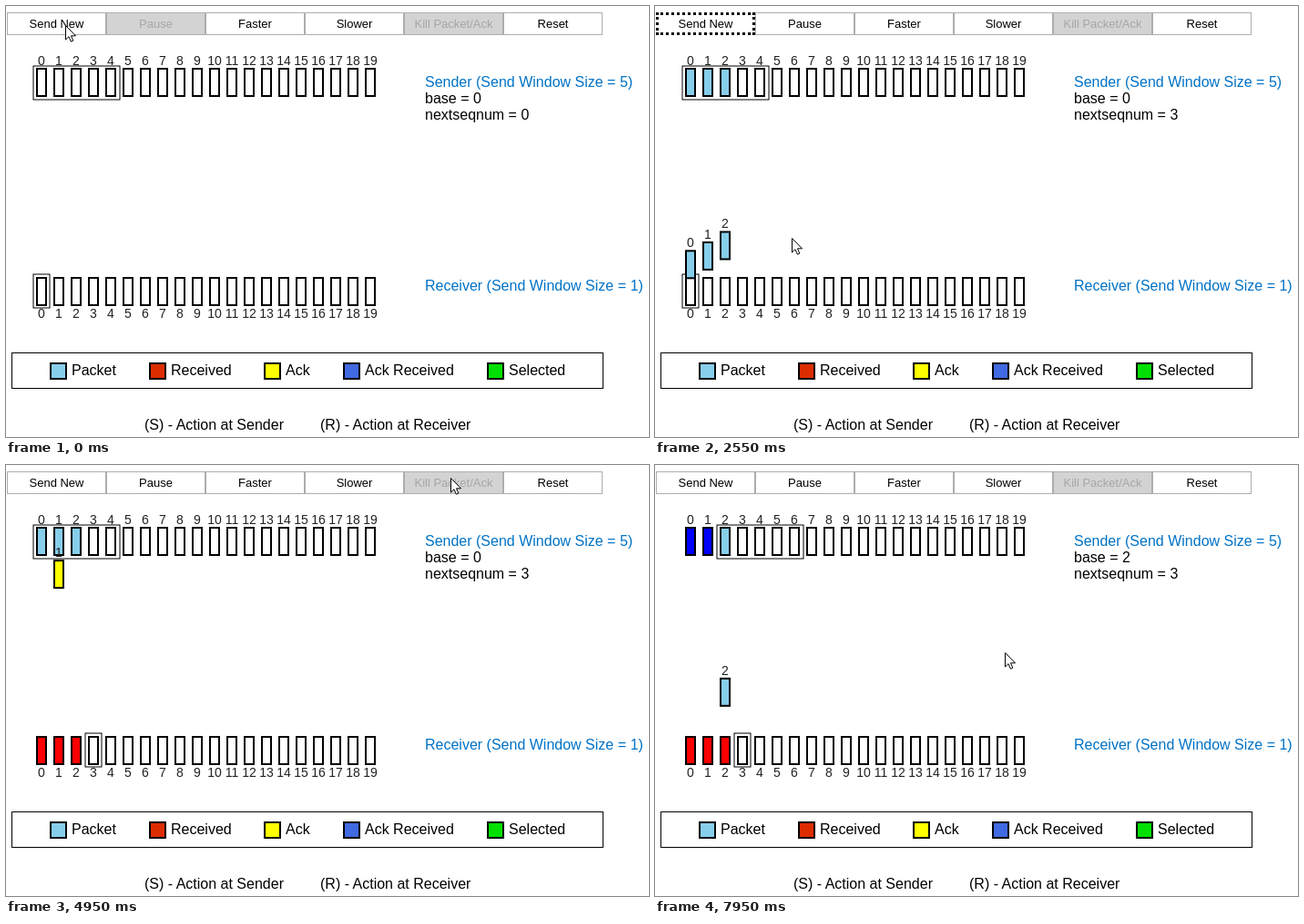
Recreate the animation shown at these times as an HTML page. Size 706 px wide and 474 px high, loop 8 s.

```html
<!DOCTYPE html>
<html lang="en">
<head>
<meta charset="utf-8">
<title>Go-Back-N</title>
<style>
  html, body { margin: 0; width: 100%; height: 100%; overflow: hidden; background: #fff; }
  body, text { font-family: "Liberation Sans", Arial, sans-serif; }
  svg { position: absolute; left: 0; top: 0; width: 706px; height: 474px; font-size: 16px; }
  .bar { position: absolute; left: 1px; top: 7px; display: flex; font-size: 13px; }
  .bar div {
    box-sizing: border-box; width: 109px; height: 25px; border: 1px solid #adadad;
    display: flex; align-items: center; justify-content: center; white-space: nowrap;
  }
  .bar .off { background: #d3d3d3; color: #a6a6a6; }
  .bar .focus { border: 3px dotted #000; }
  .num { font-size: 14px; text-anchor: middle; fill: #222; }
  .box { stroke: #000; stroke-width: 2; fill: #fff; }
  .frame { stroke: #000; fill: none; }
  .title { fill: #0072c6; }
</style>
</head>
<body>
<div class="bar"></div>
<svg viewBox="0 0 706 474"></svg>
<script>
const LOOP = 8000, TICK = 150;
const SPEED = 0.0979;
const TOP = 68, BOTTOM = 299;
const TRIP = (BOTTOM - TOP) / SPEED;
const STARTS = [504, 600, 717];
const PRESS = 450, SELECT_0 = 3000, KILL_0 = 3900, SELECT_2 = 4350, KILL_2 = 4800;
const ACKED = STARTS[1] + 2 * TRIP, RESEND = 6256;
const SKY = '#87ceeb', RED = '#f00', YELLOW = '#ff0', BLUE = '#00f', GREEN = '#00cc22';

// time, x, y of the pointer tip
const POINTER = [
  [0, 65, 21], [750, 65, 21], [1350, 181, 270], [1800, 161, 262], [2550, 150, 255],
  [3000, 38, 294], [3150, 70, 280], [3450, 332, 149], [3750, 484, 16], [3900, 484, 16],
  [4350, 78, 190], [4500, 82, 186], [4800, 488, 14], [4950, 488, 14], [5400, 384, 206]
];

const svg = document.querySelector('svg');

function add(tag, attrs, label) {
  const el = document.createElementNS(svg.namespaceURI, tag);
  for (const key in attrs) el.setAttribute(key, attrs[key]);
  if (label !== undefined) el.textContent = label;
  return svg.appendChild(el);
}
const text = (x, y, label, cls = '') => add('text', { x, y, class: cls }, label);
const rect = (x, y, width, height, cls, fill) =>
  add('rect', { x, y, width, height, class: cls, ...(fill && { style: 'fill:' + fill }) });
const column = i => 39 + 19 * i;
const cell = (i, y) => rect(column(i) - 5, y + 1, 10, 30, 'box');

const buttons = ['Send New', 'Pause', 'Faster', 'Slower', 'Kill Packet/Ack', 'Reset'].map(label => {
  const el = document.createElement('div');
  el.textContent = label;
  return document.querySelector('.bar').appendChild(el);
});

const sender = [], receiver = [];
for (let i = 0; i < 20; i++) {
  text(column(i), 65, i, 'num');
  text(column(i), 343, i, 'num');
  sender.push(cell(i, TOP));
  receiver.push(cell(i, 298));
}
const sendWindow = rect(30, 66, 95, 37, 'frame');
const receiveWindow = rect(30, 295, 18, 37, 'frame');

text(460, 89, 'Sender (Send Window Size = 5)', 'title');
const baseText = text(460, 107, '');
const nextText = text(460, 125, '');
text(460, 313, 'Receiver (Send Window Size = 1)', 'title');

rect(6.5, 381.5, 649, 39, 'frame');
[[48, 'Packet', SKY], [157, 'Received', '#dd2c00'], [283, 'Ack', YELLOW],
 [370, 'Ack Received', '#4169e1'], [528, 'Selected', '#00e000']].forEach(([x, label, color]) => {
  rect(x + 1, 393, 17, 17, 'box', color);
  text(x + 24, 406, label);
});
text(152, 466, '(S) - Action at Sender');
text(345, 466, '(R) - Action at Receiver');

const movers = STARTS.map((_, i) => ({ box: cell(i, 0), num: text(column(i), 0, i, 'num') }));
const pointer = add('path', {
  d: 'M.5 .5V16L4 12.7L6.4 18.2L8.8 17.1L6.5 11.8H11.5Z', fill: '#fff', stroke: '#000'
});

function pointerAt(t) {
  const next = POINTER.findIndex(p => p[0] > t);
  if (next < 0) return POINTER[POINTER.length - 1].slice(1);
  const [t0, x0, y0] = POINTER[next - 1], [t1, x1, y1] = POINTER[next];
  const k = (t - t0) / (t1 - t0);
  return [x0 + (x1 - x0) * k, y0 + (y1 - y0) * k].map(Math.round);
}

// Position and colour of a travelling packet or ack, or null when none is under way
function flight(i, t) {
  if (i === 2 && t >= RESEND) return { y: TOP + (t - RESEND) * SPEED, fill: SKY };
  const end = [KILL_0, ACKED, KILL_2][i];
  if (t < STARTS[i] || t >= end) return null;
  const age = t - STARTS[i];
  if (age < TRIP) return { y: TOP + age * SPEED, fill: SKY };
  const selected = (i === 0 && t >= SELECT_0) || (i === 2 && t >= SELECT_2);
  return { y: BOTTOM - (age - TRIP) * SPEED, fill: selected ? GREEN : YELLOW };
}

function render(t) {
  const sent = STARTS.filter(s => t >= s).length;
  const received = STARTS.filter(s => t >= s + TRIP).length;
  const base = t >= ACKED ? 2 : 0;
  const canKill = (t >= SELECT_0 && t < KILL_0) || (t >= SELECT_2 && t < KILL_2);

  buttons[0].classList.toggle('focus', t >= PRESS && t < SELECT_0);
  buttons[1].classList.toggle('off', sent === 0);
  buttons[4].classList.toggle('off', !canKill);

  movers.forEach(({ box, num }, i) => {
    sender[i].style.fill = i < base ? BLUE : i < sent ? SKY : '#fff';
    receiver[i].style.fill = i < received ? RED : '#fff';
    const f = flight(i, t);
    box.style.display = num.style.display = f ? '' : 'none';
    if (!f) return;
    box.setAttribute('y', f.y + 1);
    box.style.fill = f.fill;
    num.setAttribute('y', f.y - 3);
  });

  sendWindow.setAttribute('x', 30 + 19 * base);
  receiveWindow.setAttribute('x', 30 + 19 * received);
  baseText.textContent = 'base = ' + base;
  nextText.textContent = 'nextseqnum = ' + sent;
  pointer.setAttribute('transform', `translate(${pointerAt(t)})`);
}

const begin = performance.now();
function loop() {
  const t = (performance.now() - begin) % LOOP;
  render(Math.floor(t / TICK) * TICK);
  requestAnimationFrame(loop);
}
loop();
</script>
</body>
</html>
```
